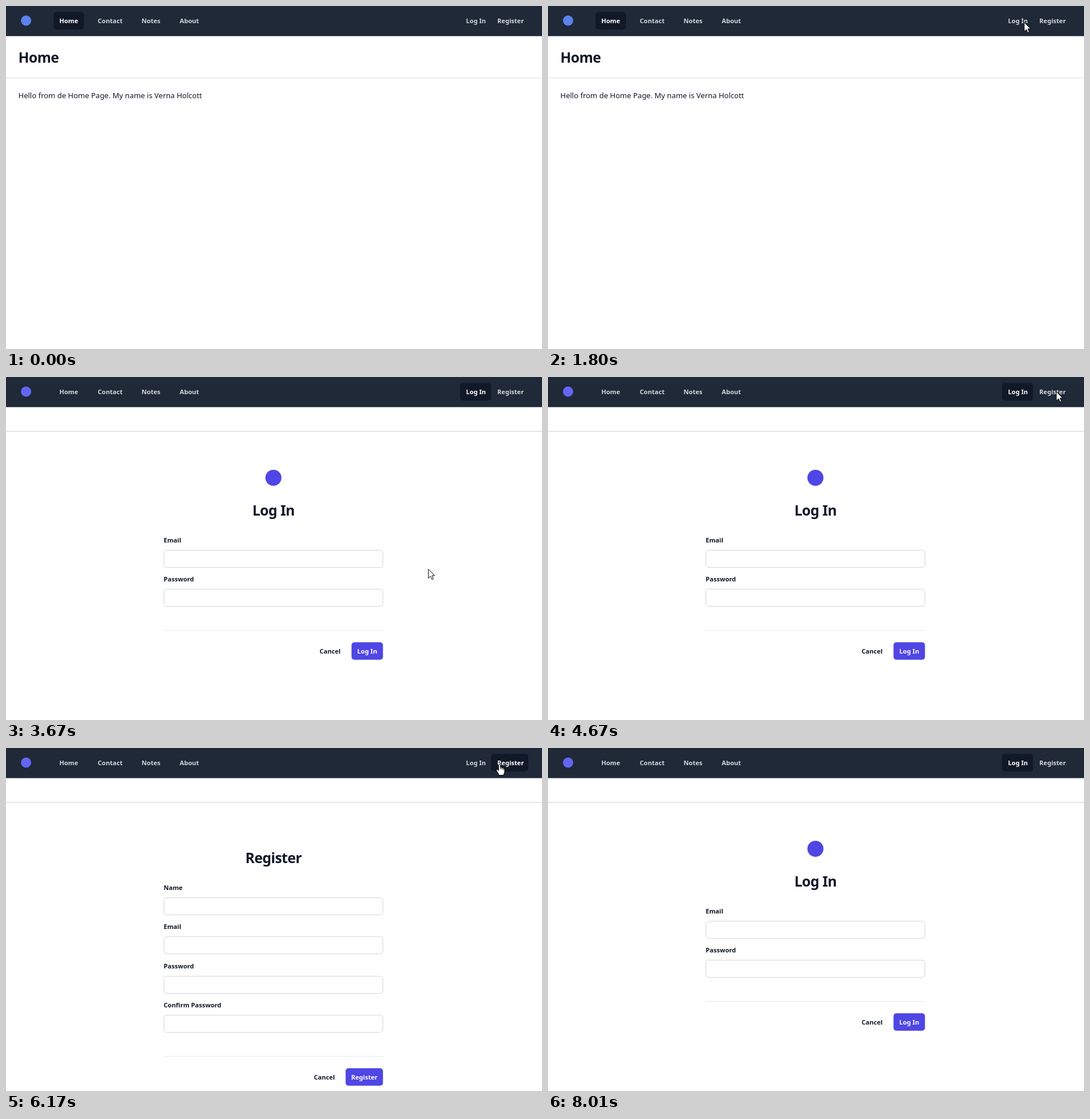
An HTML page with a canvas that plays this animation: 935 by 599 pixels, repeating every 8.5 s.

```html
<!DOCTYPE html>
<html lang="en">
<head>
<meta charset="utf-8">
<title>Log in and register</title>
<style>
  html, body { margin: 0; width: 100%; height: 100%; overflow: hidden; background: #fff; }
  canvas { display: block; width: 935px; height: 599px; }
</style>
</head>
<body>
<canvas id="stage" width="935" height="599"></canvas>
<script>
const ctx = document.getElementById('stage').getContext('2d');
const LOOP = 8500;
const FAMILY = '"Noto Sans", "Open Sans", sans-serif';
const INK = '#111827', INDIGO = '#4f46e5';

const ARROW = new Path2D('M0 0V16L3.7 12.4L6.2 18L8.7 16.9L6.2 11.4H11Z');
const HAND = new Path2D('M-1.6 1.5Q0 -1 1.6 1.5V6.5Q3.6 5.4 4.4 7.2Q6.4 6.4 7 8.2Q9 8 9 10V14Q9 16 7.5 18V20H-1.5V18L-5 12.5Q-6 10.5 -4.4 10Q-3 9.8 -1.6 12Z');

// Pages in order of appearance; logos load shortly after each switch.
const visits = [
  { at: 0, page: 'Home', logo: 0 },
  { at: 1990, page: 'Log In', logo: 2150 },
  { at: 4830, page: 'Register', logo: 4990 },
  { at: 7000, page: 'Log In', logo: 7160 }
];

const links = [['Home', 93, 83, 53], ['Contact', 160], ['Notes', 236.5], ['About', 303],
  ['Log In', 802.5, 792, 54], ['Register', 857, 846, 65]];

const forms = {
  'Log In': { titleY: 242, top: 302, fields: ['Email', 'Password'], cancelX: 547, buttonX: 602.7 },
  'Register': { titleY: 201, top: 261, fields: ['Name', 'Email', 'Password', 'Confirm Password'], cancelX: 537, buttonX: 592.4 }
};
const RIGHT = 657.6;

// Pointer moves: start, end, number of positions, Bezier points.
const moves = [
  { from: 300, to: 1300, n: 7, path: [[896, 588], [665, 430], [780, 180], [836, 35]] },
  { from: 1480, to: 1800, n: 3, path: [[835, 33], [833, 30], [831, 28], [831, 28]] },
  { from: 2470, to: 3490, n: 7, path: [[850, 42], [827, 41], [745, 330], [733, 346]] },
  { from: 3670, to: 4330, n: 5, path: [[737, 335], [760, 200], [850, 60], [887, 25]] },
  { from: 6170, to: 7000, n: 6, path: [[861, 27], [835, 27], [818, 27], [814, 27]] },
  { from: 7340, to: 7840, n: 4, path: [[822, 60], [835, 260], [880, 460], [928, 590]] }
];
const handTimes = [[1990, 2470], [4830, 7340]];

function latest(list, key, t) {
  return list.filter(item => item[key] <= t).pop();
}

function text(str, x, y, color = INK, size = 11.1, weight = 600, align = 'left') {
  ctx.font = `${weight} ${size}px ${FAMILY}`;
  ctx.textAlign = align;
  ctx.fillStyle = color;
  ctx.fillText(str, x, y);
}

function title(str, x, y, align) {
  ctx.letterSpacing = '-0.6px';
  text(str, x, y, INK, 24.7, 700, align);
  ctx.letterSpacing = '0px';
}

function rect(x, y, w, h, color) {
  ctx.fillStyle = color;
  ctx.fillRect(x, y, w, h);
}

function box(x, y, w, h, fill, stroke) {
  ctx.beginPath();
  ctx.roundRect(x, y, w, h, 5);
  ctx.fillStyle = fill;
  ctx.fill();
  if (stroke) {
    ctx.lineWidth = 1;
    ctx.strokeStyle = stroke;
    ctx.stroke();
  }
}

function dot(x, y, r, color) {
  ctx.beginPath();
  ctx.arc(x, y, r, 0, Math.PI * 2);
  ctx.fillStyle = color;
  ctx.fill();
}

function drawNav(page, logo) {
  rect(0, 0, 935, 52.6, '#1f2937');
  if (logo) dot(35, 25.5, 9, page === 'Home' ? '#5b82ee' : '#6366f1');
  for (const [name, x, boxX, boxW] of links) {
    const active = name === page;
    if (active) box(boxX, 10.2, boxW, 30.7, INK);
    text(name, x, 30, active ? '#fff' : '#d1d5db');
  }
}

function drawShadow(y) {
  rect(0, y, 935, 1, '#dedee0');
  rect(0, y + 1, 935, 1, '#f0f0f1');
  rect(0, y + 2, 935, 1, '#fbfbfb');
}

function drawHome() {
  drawShadow(124.6);
  title('Home', 21.5, 99, 'left');
  text('Hello from de Home Page. My name is Verna Holcott', 21.5, 160.5, INK, 13, 400);
}

function drawForm(name, logo) {
  const form = forms[name];
  drawShadow(94);
  if (logo && name === 'Log In') dot(466.5, 176, 14, INDIGO);
  title(name, 466.5, form.titleY, 'center');
  let y = form.top;
  for (const field of form.fields) {
    const top = Math.round(y);
    text(field, 275, top - 13);
    box(275.5, top + 0.5, 382, 30, '#fff', '#d1d5db');
    y += 68.3;
  }
  const line = Math.round(y + 3.5);
  rect(275, line, 383, 1, '#e5e7eb');
  text('Cancel', form.cancelX, line + 41);
  box(form.buttonX, line + 21.2, RIGHT - form.buttonX, 30.6, INDIGO);
  text(name, (form.buttonX + RIGHT) / 2, line + 41, '#fff', 11.1, 600, 'center');
}

function bezier(p, u) {
  const v = 1 - u;
  return [0, 1].map(k => v * v * v * p[0][k] + 3 * v * v * u * p[1][k]
    + 3 * v * u * u * p[2][k] + u * u * u * p[3][k]);
}

function drawPointer(t) {
  const move = latest(moves, 'from', t);
  if (!move || t >= 8010) return;
  const gap = (move.to - move.from) / (move.n - 1);
  const step = Math.min(move.n - 1, Math.floor((t - move.from + 20) / gap));
  const [x, y] = bezier(move.path, step / (move.n - 1));
  const hand = handTimes.some(([a, b]) => t >= a && t < b);
  ctx.save();
  ctx.translate(Math.round(x) - 0.2, Math.round(y) + 0.5);
  ctx.lineJoin = 'round';
  ctx.lineWidth = 1;
  ctx.fillStyle = '#fff';
  ctx.strokeStyle = '#000';
  const shape = hand ? HAND : ARROW;
  ctx.fill(shape);
  ctx.stroke(shape);
  if (hand) {
    ctx.beginPath();
    for (const [lx, ly] of [[1.6, 6.5], [4.4, 7.2], [7, 8.2]]) {
      ctx.moveTo(lx, ly);
      ctx.lineTo(lx, ly + 3);
    }
    ctx.stroke();
  }
  ctx.restore();
}

function draw(now) {
  const t = now % LOOP;
  const visit = latest(visits, 'at', t);
  const logo = t >= visit.logo;
  rect(0, 0, 935, 599, '#fff');
  drawNav(visit.page, logo);
  if (visit.page === 'Home') drawHome();
  else drawForm(visit.page, logo);
  drawPointer(t);
}

let start;
function frame(now) {
  start ??= now;
  draw(now - start);
  requestAnimationFrame(frame);
}
draw(0);
requestAnimationFrame(frame);
</script>
</body>
</html>
```
